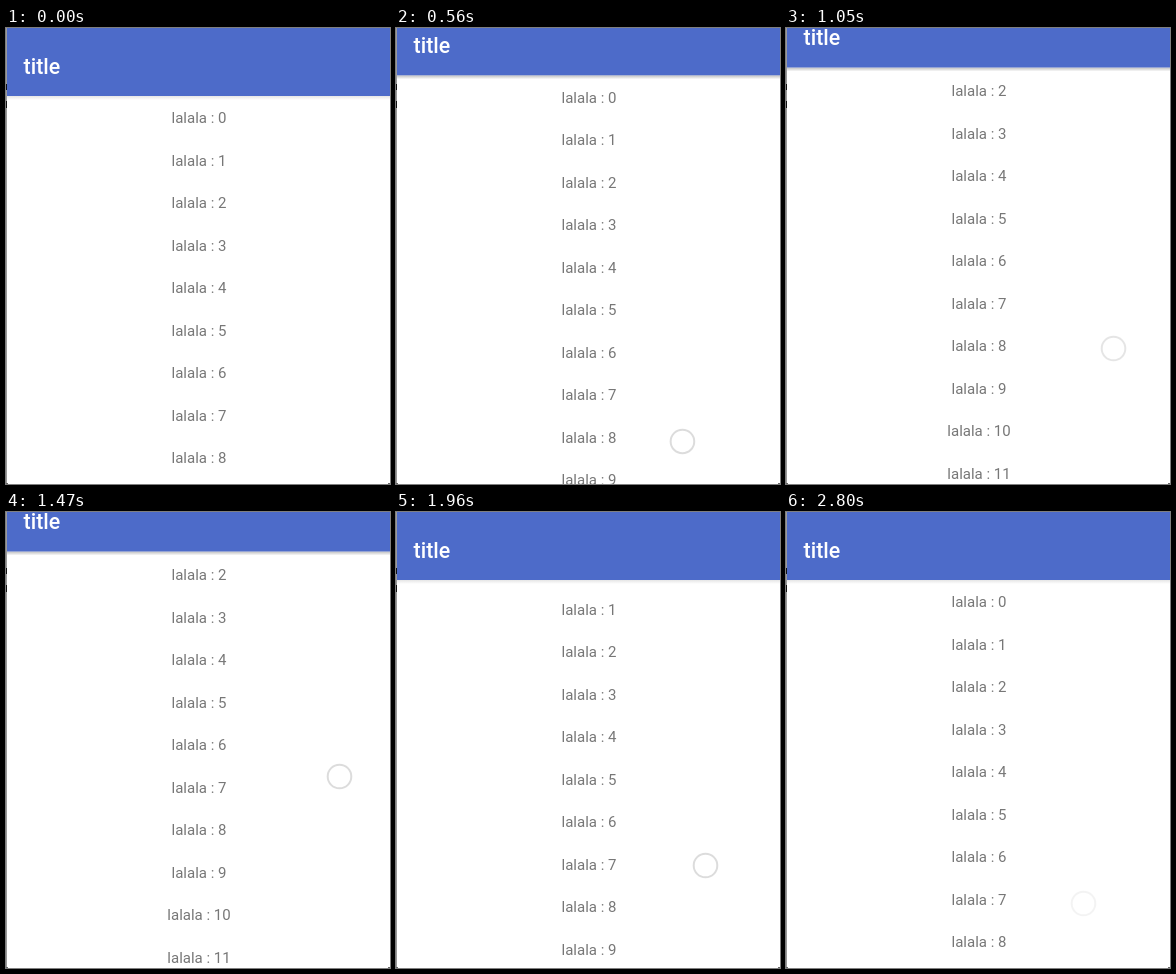
Write an HTML page with a canvas that moves like this. It is 384x456 px and loops after 3.36 s.

```html
<!DOCTYPE html>
<html lang="en">
<head>
<meta charset="utf-8">
<title>Scrolling list</title>
<style>
html, body { margin: 0; width: 384px; height: 456px; overflow: hidden; background: #fff; }
canvas { display: block; }
</style>
</head>
<body>
<canvas id="stage" width="384" height="456"></canvas>
<script>
const ctx = document.getElementById('stage').getContext('2d');
const W = 384, H = 456, LOOP = 3360, STEP = 70;
const BAR = 68, COLLAPSE = 28.5, ROW = 42.5;

// Key points are [time, value]
const offsetKeys = [[420, 0], [770, -74.5], [1050, -112], [1470, -112],
  [1680, -79], [1960, -35], [2240, -12], [2520, -3], [2660, 0]];
const touches = [
  { from: 420, to: 1190,
    x: [[420, 279], [770, 306], [1050, 327]],
    y: [[420, 438], [770, 352], [1050, 320]],
    alpha: [[980, 1], [1050, .75], [1190, 0]] },
  { from: 1470, to: LOOP,
    x: [[1470, 333], [1680, 321], [1960, 309], [2240, 303], [2520, 299], [2800, 297]],
    y: [[1470, 264], [1680, 309], [1960, 353], [2240, 375], [2520, 385], [2800, 391]],
    alpha: [[2660, 1], [2800, .35]] }
];

// Monotone cubic curve, at rest at both ends
function curve(keys, t) {
  const last = keys.length - 1;
  if (t <= keys[0][0]) return keys[0][1];
  if (t >= keys[last][0]) return keys[last][1];
  const i = keys.findIndex(k => k[0] > t) - 1;
  const slope = j => (keys[j + 1][1] - keys[j][1]) / (keys[j + 1][0] - keys[j][0]);
  const tangent = j => {
    if (j === 0 || j === last) return 0;
    const a = slope(j - 1), b = slope(j);
    return a * b > 0 ? 2 * a * b / (a + b) : 0;
  };
  const [t0, v0] = keys[i], [t1, v1] = keys[i + 1];
  const d = t1 - t0, u = (t - t0) / d, w = 1 - u;
  return v0 * (1 + 2 * u) * w * w + v1 * u * u * (3 - 2 * u)
    + d * u * w * (w * tangent(i) - u * tangent(i + 1));
}

function rect(color, x, y, w, h) {
  ctx.fillStyle = color;
  ctx.fillRect(x, y, w, h);
}

function drawList(offset) {
  ctx.font = '15px Roboto, sans-serif';
  ctx.textAlign = 'center';
  ctx.fillStyle = '#777';
  for (let i = 0; i < 14; i++)
    ctx.fillText('lalala : ' + i, 193, 95.4 + i * ROW + offset);
}

function drawBar(shift) {
  const bottom = BAR + shift;
  const shade = ctx.createLinearGradient(0, bottom, 0, bottom + 4);
  shade.addColorStop(0, `rgba(0,0,0,${shift < 0 ? .25 : .1})`);
  shade.addColorStop(1, 'rgba(0,0,0,0)');
  rect(shade, 1, bottom, W, 4);
  rect('#4d6bc9', 1, 0, W, bottom);
  ctx.font = '500 21.4px Roboto, sans-serif';
  ctx.textAlign = 'left';
  ctx.fillStyle = '#fff';
  ctx.fillText('title', 17.6, 45.8 + shift);
}

function drawEdge() {
  rect('#999', 0, 0, 1, H);
  rect('#111', 0, 56, 1, 6);
  rect('#111', 0, 73, 1, 7);
  rect('#666', 0, H - 1, 2, 1);
  rect('#666', W - 2, H - 1, 2, 1);
}

function drawTouch(touch, t) {
  if (t < touch.from || t >= touch.to) return;
  ctx.globalAlpha = curve(touch.alpha, t);
  ctx.strokeStyle = '#dcdcdc';
  ctx.lineWidth = 2;
  ctx.beginPath();
  ctx.arc(curve(touch.x, t) + .5, curve(touch.y, t) + .5, 11.8, 0, Math.PI * 2);
  ctx.stroke();
  ctx.globalAlpha = 1;
}

function draw(t) {
  const offset = curve(offsetKeys, t);
  // The bar takes the first part of each drag, in either direction
  const shift = t < 1260 ? Math.max(-COLLAPSE, offset)
    : Math.min(0, offset + 112 - COLLAPSE);
  rect('#fff', 0, 0, W, H);
  drawList(offset);
  drawBar(shift);
  drawEdge();
  touches.forEach(touch => drawTouch(touch, t));
}

const start = performance.now();
function tick() {
  const t = (performance.now() - start) % LOOP;
  draw(Math.floor(t / STEP) * STEP);
  requestAnimationFrame(tick);
}
tick();
</script>
</body>
</html>
```
